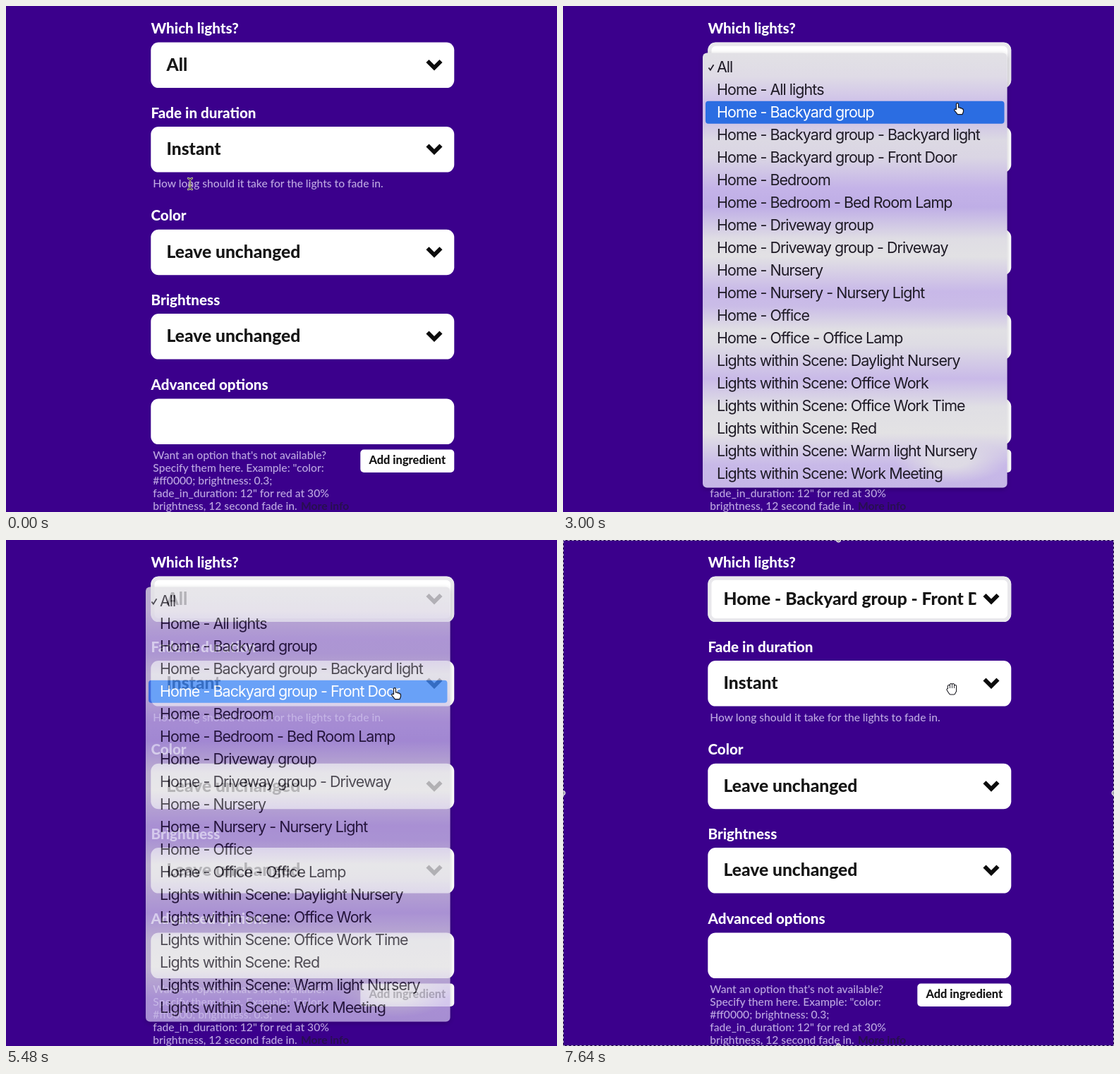
These frames come from a looping animation (781 by 717 pixels, 7670 ms). An HTML page:

```html
<!DOCTYPE html>
<html lang="en">
<head>
<meta charset="utf-8">
<title>Light settings</title>
<style>
  html, body { margin: 0; width: 100%; height: 100%; overflow: hidden; background: #3b008c; }
  svg { display: block; width: 781px; height: 717px; }
  text { white-space: pre; }
  .label, .value, .button { font-family: Lato, "Open Sans", sans-serif; font-weight: 800; }
  .label { font-size: 20.6px; fill: #fff; }
  .value { font-size: 24.6px; fill: #161616; }
  .button { font-size: 16.4px; fill: #161616; text-anchor: middle; }
  .hint { font: 500 15.65px Lato, "Open Sans", sans-serif; fill: #bea8e2; }
  .more { font-weight: 700; fill: #280f50; }
  .item {
    font: 21.5px Inter, "Liberation Sans", sans-serif; font-optical-sizing: none;
    letter-spacing: -.045em; fill: #1f1b26;
  }
  .item.on { fill: #fff; }
</style>
</head>
<body>
<svg id="stage" viewBox="0 0 781 717" xmlns="http://www.w3.org/2000/svg"></svg>
<script>
const LOOP = 7670, OPEN = 1550, FADE = 5443, FADE_MS = 174, PICK = 5690, SELECT = 7600;
const ROW = 32, MENU_TOP = 71;

const items = [
  'All', 'Home - All lights', 'Home - Backyard group',
  'Home - Backyard group - Backyard light', 'Home - Backyard group - Front Door',
  'Home - Bedroom', 'Home - Bedroom - Bed Room Lamp',
  'Home - Driveway group', 'Home - Driveway group - Driveway',
  'Home - Nursery', 'Home - Nursery - Nursery Light',
  'Home - Office', 'Home - Office - Office Lamp',
  'Lights within Scene: Daylight Nursery', 'Lights within Scene: Office Work',
  'Lights within Scene: Office Work Time', 'Lights within Scene: Red',
  'Lights within Scene: Warm light Nursery', 'Lights within Scene: Work Meeting'
];
const hints = [
  'Want an option that\'s not available?', 'Specify them here. Example: "color:',
  '#ff0000; brightness: 0.3;', 'fade_in_duration: 12" for red at 30%',
  'brightness, 12 second fade in.'
];
// label, box top, chosen value
const fields = [
  ['Which lights?', 51.5, 'All'], ['Fade in duration', 171, 'Instant'],
  ['Color', 316.7, 'Leave unchanged'], ['Brightness', 436, 'Leave unchanged'],
  ['Advanced options', 556.5, '']
];
// backdrop shade of the menu by height
const shades = [
  [66, '#e2e1e5'], [100, '#dfdbe6'], [140, '#cdbfe9'], [160, '#ccc0e6'], [190, '#dcd9e3'],
  [215, '#dad5e4'], [258, '#c4b3e8'], [285, '#bfaee6'], [330, '#dfdde4'], [355, '#e2e1e4'],
  [405, '#c8b8e8'], [425, '#cabce7'], [460, '#e1e0e4'], [480, '#dedce4'], [528, '#c9bae8'],
  [568, '#e0dfe4'], [605, '#e3e2e4'], [650, '#c8b9e8'], [683, '#c5b6e6']
];
// time, x, y of the pointer's hot spot
const path = [
  [0, 261, 252], [260, 261, 252], [750, 440, 175], [1200, 603, 78], [1480, 605, 76],
  [1800, 605, 76], [2500, 580, 116], [3000, 559, 138], [3250, 558, 140],
  [3700, 553, 202], [3850, 552, 205], [4200, 550.5, 210], [5610, 551, 210],
  [6200, 551, 210], [7100, 551, 211], [LOOP, 551, 211]
];

const text = (cls, x, y, s, more = '') =>
  `<text class="${cls}" x="${x}" y="${y}" ${more}>${s}</text>`;
const box = (x, y, w, h, r, fill, more = '') =>
  `<rect x="${x}" y="${y}" width="${w}" height="${h}" rx="${r}" fill="${fill}" ${more}/>`;

const field = ([label, top, value], i) =>
  text('label', 205.5, top - 12.5, label) +
  box(205.3, top, 430, 64.6, 11, '#fff') +
  (value && text('value', 227.5, top + 40.3, value, i ? '' : 'id="value" clip-path="url(#clip)"') +
    `<path d="M597.5 ${top + 26.5}l9.5 9.5l9.5 -9.5" fill="none" stroke="#0c0c0c" stroke-width="5.8"/>`);

const menu = `<g id="menu">
  ${box(198, 66.5, 431.6, 616, 6, 'url(#shade)', 'filter="url(#shadow)"')}
  ${box(470, 612, 159.6, 64, 6, 'url(#glow)')}
  ${box(202, MENU_TOP - .2, 423.5, ROW, 4, '#2b6de2', 'id="bar"')}
  <path d="M206.5 87.5l2.4 3.2l4.6 -7.4" fill="none" stroke="#1f1b26" stroke-width="1.7"/>
  ${items.map((s, i) => text('item', 218, 94.4 + i * ROW, s)).join('')}
</g>`;

const openHand = 'M-4 0V-4M-1 0V-6M2 0V-6M5 1V-4M-5.5 1L-3 5M-4 0H5V3L3 6.5H-2Z';
const cursors = `
  <g id="beam"><path d="M-4 -8q4 0 4 3V5q0 3 -4 3M4 -8q-4 0 -4 3M0 5q0 3 4 3M-2.5 2H2.5"
     fill="none" stroke="#d6d8b0" stroke-width="2.6"/>
    <path d="M-3.5 -8q3.5 0 3.5 3V5q0 3 -3.5 3M3.5 -8q-3.5 0 -3.5 3M0 5q0 3 3.5 3"
     fill="none" stroke="#33282f" stroke-width="1"/></g>
  <path id="arrow" d="M0 0V14L3.3 11L5.4 15.8L7.8 14.8L5.8 10.2H10Z"
     fill="#111" stroke="#fff" stroke-width="1.1"/>
  <path id="hand"
     d="M-1.5 8.5V1.2a1.5 1.5 0 0 1 3 0V6q2.7 -.6 2.7 .8q2.3 -.4 2.3 .9q2 0 2 1.8V12L7 15.6H.4L-4.3 9.8q0 -2.2 2 -1.4Z"
     fill="#fff" stroke="#15151c" stroke-width="1.2"/>
  <g id="grab" stroke-linecap="round" stroke-linejoin="round" fill="#fff">
    <path d="${openHand}" stroke="#15151c" stroke-width="4.2"/>
    <path d="${openHand}" stroke="#fff" stroke-width="2.1"/></g>`;

const frame = `<g id="frame">
  <rect x=".5" y=".5" width="780" height="716" fill="none" stroke="#1c0a3c"/>
  <rect x=".5" y=".5" width="780" height="716" fill="none" stroke="#c9c2d6" stroke-dasharray="3 3"/>
  ${[[390.5, 0], [0, 358.5], [781, 358.5], [390.5, 717]].map(([x, y]) =>
    `<circle cx="${x}" cy="${y}" r="3.2" fill="#a9a5b2" stroke="#eee"/>`).join('')}
</g>`;

document.getElementById('stage').innerHTML = `
  <defs>
    <clipPath id="clip"><rect x="220" y="55" width="365.5" height="58"/></clipPath>
    <linearGradient id="shade" gradientUnits="userSpaceOnUse" x1="0" y1="66" x2="0" y2="683">
      ${shades.map(([y, c]) => `<stop offset="${(y - 66) / 617}" stop-color="${c}"/>`).join('')}
    </linearGradient>
    <radialGradient id="glow"><stop offset=".3" stop-color="#e0dee4" stop-opacity=".9"/>
      <stop offset="1" stop-color="#e0dee4" stop-opacity="0"/></radialGradient>
    <filter id="shadow" x="-10%" y="-10%" width="120%" height="120%">
      <feDropShadow dx="0" dy="2" stdDeviation="3" flood-color="#000" flood-opacity=".25"/></filter>
  </defs>
  ${box(0, 0, 781, 717, 0, '#3b008c')}
  ${fields.map(field).join('')}
  ${box(208, 54.2, 424.6, 59.2, 8.5, 'none', 'id="ring" stroke="#e9e8ec" stroke-width="5"')}
  ${text('hint', 208.3, 257.3, 'How long should it take for the lights to fade in.')}
  ${hints.map((s, i) => text('hint', 208.3, 642.3 + i * 18, s)).join('')}
  ${text('hint more', 418, 714.3, 'More info')}
  ${box(502.3, 628.5, 133, 32.4, 5, '#fff')}
  ${text('button', 568.8, 649.3, 'Add ingredient')}
  ${menu}${frame}<g id="cursor">${cursors}</g>`;

const el = id => document.getElementById(id);
const rows = [...document.querySelectorAll('.item')];
const kinds = ['beam', 'arrow', 'hand', 'grab'].map(el);
const show = (node, on) => node.setAttribute('visibility', on ? 'visible' : 'hidden');

function pointer(t) {
  const i = Math.max(1, path.findIndex(p => p[0] > t));
  const [a, b] = [path[i - 1], path[i]];
  const k = (t - a[0]) / (b[0] - a[0]), e = k * k * (3 - 2 * k);
  return [a[1] + (b[1] - a[1]) * e, a[2] + (b[2] - a[2]) * e];
}

function kindAt(t) {
  if (t >= SELECT) return 3;
  if (t >= OPEN + 60) return 2;
  return t < 330 ? 0 : 1;
}

function draw(t) {
  const [x, y] = pointer(t);
  const alpha = t < OPEN ? 0 : Math.max(0, Math.min(1, 1 - (t - FADE) / FADE_MS));
  const row = Math.max(0, Math.floor((y - MENU_TOP) / ROW));
  const kind = kindAt(t);

  el('menu').setAttribute('opacity', alpha);
  el('bar').setAttribute('y', MENU_TOP - .2 + row * ROW);
  el('bar').setAttribute('fill', row < 3 ? '#2b6de2' : '#4087f5');
  rows.forEach((r, i) => r.classList.toggle('on', i === row));
  el('value').textContent = t < PICK ? items[0] : items[4];
  show(el('ring'), t >= OPEN);
  show(el('frame'), t >= SELECT);
  kinds.forEach((c, i) => show(c, i === kind));
  el('cursor').setAttribute('transform', `translate(${x} ${y})`);
}

const start = performance.now();
function tick() {
  draw((performance.now() - start) % LOOP);
  requestAnimationFrame(tick);
}
tick();
</script>
</body>
</html>
```
